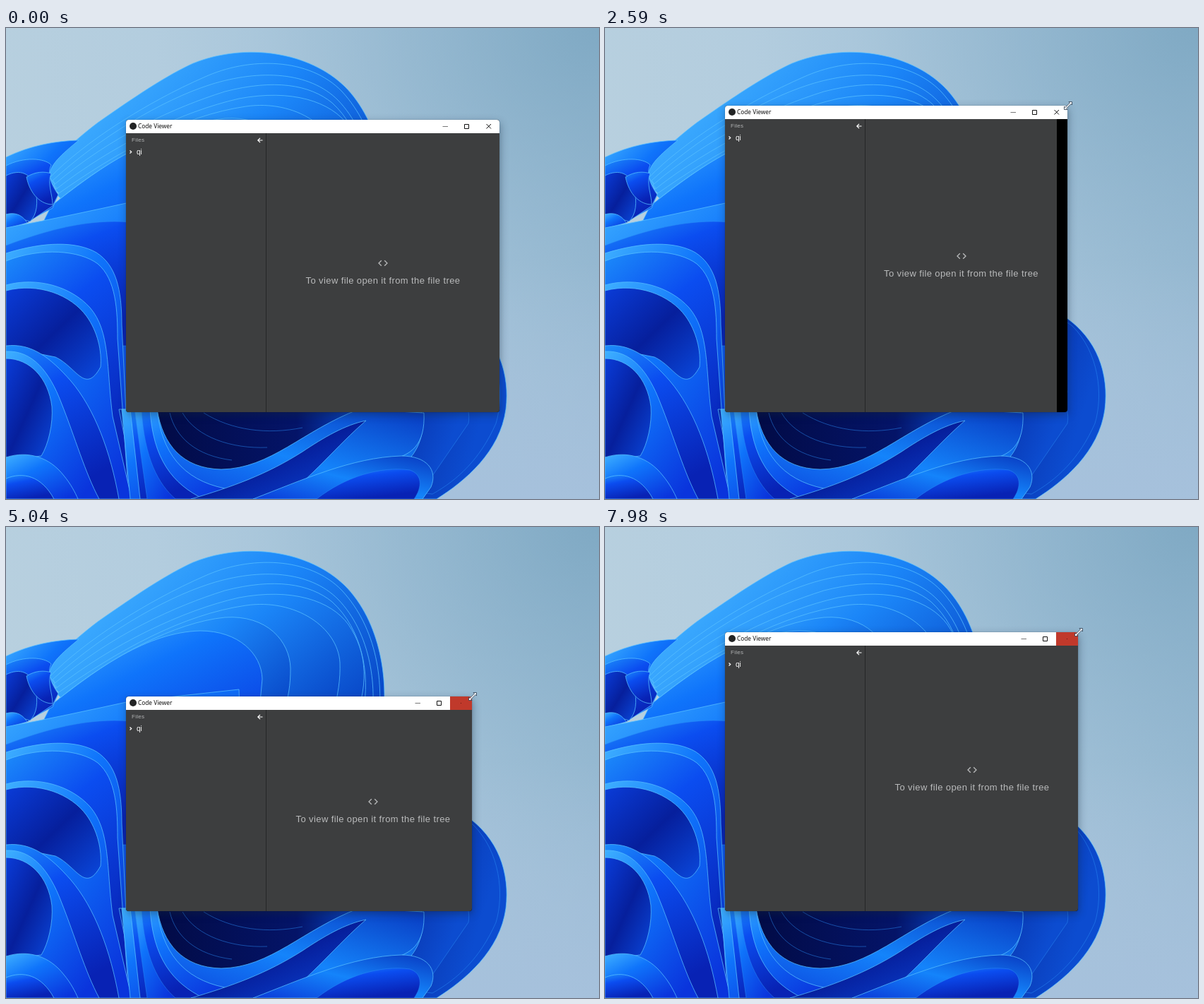
Animation of 840 by 667 pixels, one loop 8 s. Source, as an HTML page:

```html
<!DOCTYPE html>
<html lang="en">
<head>
<meta charset="utf-8">
<title>Code Viewer</title>
<style>
html, body { margin: 0; width: 100%; height: 100%; overflow: hidden; }
body { position: relative; background: #a9c6db; }
.wall { position: absolute; left: 0; top: 0; width: 840px; height: 667px; }
.fold path { stroke: #58c0ff; stroke-width: 1; stroke-opacity: .75; }
.fold .soft { stroke: #2b8cf5; stroke-opacity: .5; }
.win {
  position: absolute; left: 170px; width: 529px; height: 414px; top: 130px;
  border-radius: 4px; box-shadow: 1px 4px 12px rgba(20, 35, 60, .42), 0 0 1px rgba(0, 0, 0, .7);
}
.clip { position: absolute; inset: 0; overflow: hidden; border-radius: 4px; background: #000; }
.bar { position: absolute; left: 0; right: 0; top: 0; height: 19px; background: #fff; }
.dot { position: absolute; left: 5px; top: 4px; width: 10px; height: 10px; border-radius: 50%; background: #232425; }
.name { position: absolute; left: 17px; top: 3px; font: 8.3px/12px "Noto Sans", "Open Sans", sans-serif; color: #111; white-space: nowrap; }
.btns { position: absolute; right: 0; top: 0; width: 93px; height: 19px; }
.hot { position: absolute; right: 0; top: 0; width: 31px; height: 19px; background: #c0392b; visibility: hidden; }
.hot::after { content: ""; position: absolute; left: 15px; top: 9px; width: 1px; height: 1px; background: #621a14; }
.page { position: absolute; left: 0; top: 19px; background: #3d3e3f; font-family: "Liberation Sans", Arial, sans-serif; }
.side { position: absolute; left: 0; top: 0; bottom: 0; width: 198px; border-right: 1px solid #252627; }
.head { position: absolute; left: 8px; top: 4px; font-size: 8px; line-height: 11px; letter-spacing: .25px; color: #b2b3b4; }
.dir { position: absolute; left: 15px; top: 20px; font-size: 10px; line-height: 13px; color: #fff; }
.side svg { position: absolute; left: 0; top: 0; }
.view {
  position: absolute; left: 199px; right: 0; top: 0; bottom: 0; padding: 0 10px;
  display: flex; flex-direction: column; align-items: center; justify-content: center;
}
.view svg { flex: none; margin-bottom: 12px; }
.view p { margin: 0; font-size: 13px; line-height: 15px; letter-spacing: .385px; color: #b9babb; }
.cur { position: absolute; left: -8px; top: -8px; visibility: hidden; }
</style>
</head>
<body>
<svg class="wall" viewBox="0 0 840 667">
  <defs>
    <linearGradient id="sky" x1="0" y1=".5" x2="1" y2=".35">
      <stop offset="0" stop-color="#b8d0df"/><stop offset=".5" stop-color="#b0cbde"/><stop offset="1" stop-color="#98bad2"/>
    </linearGradient>
    <radialGradient id="dim" cx="1" cy="0" r=".75">
      <stop offset="0" stop-color="#78a4bf" stop-opacity=".75"/><stop offset="1" stop-color="#8fb5d0" stop-opacity="0"/>
    </radialGradient>
    <linearGradient id="low" x1="0" y1="0" x2="0" y2="1">
      <stop offset=".5" stop-color="#a6c1dc" stop-opacity="0"/><stop offset="1" stop-color="#a6c1dc"/>
    </linearGradient>
    <linearGradient id="top" x1=".2" y1="0" x2="1" y2=".6">
      <stop offset="0" stop-color="#43b2ff"/><stop offset=".45" stop-color="#1b86f8"/><stop offset="1" stop-color="#0743c4"/>
    </linearGradient>
    <linearGradient id="mid" x1="0" y1="0" x2=".8" y2="1">
      <stop offset="0" stop-color="#3fb0ff"/><stop offset=".4" stop-color="#0f74fb"/><stop offset="1" stop-color="#0a34dc"/>
    </linearGradient>
    <linearGradient id="cup" x1="0" y1="0" x2=".4" y2="1">
      <stop offset="0" stop-color="#1c8cfa"/><stop offset=".35" stop-color="#0b4df0"/><stop offset="1" stop-color="#0822b4"/>
    </linearGradient>
    <linearGradient id="deep" x1="0" y1="0" x2="1" y2="1">
      <stop offset="0" stop-color="#0a3cd8"/><stop offset=".5" stop-color="#061f9c"/><stop offset="1" stop-color="#0a48dc"/>
    </linearGradient>
    <linearGradient id="rim" x1="0" y1="0" x2="1" y2=".3">
      <stop offset="0" stop-color="#0b3fd2"/><stop offset=".5" stop-color="#072a9c"/><stop offset="1" stop-color="#0c4cd0"/>
    </linearGradient>
    <linearGradient id="wave" x1="0" y1="1" x2="1" y2="0">
      <stop offset="0" stop-color="#0a3ad8"/><stop offset=".5" stop-color="#1484fb"/><stop offset="1" stop-color="#0839c0"/>
    </linearGradient>
    <linearGradient id="pit" x1="0" y1="0" x2="1" y2="0">
      <stop offset="0" stop-color="#0a2ea8"/><stop offset=".15" stop-color="#020b46"/><stop offset=".7" stop-color="#041468"/><stop offset="1" stop-color="#0a50dc"/>
    </linearGradient>
  </defs>
  <rect width="840" height="667" fill="url(#sky)"/>
  <rect width="840" height="667" fill="url(#dim)"/>
  <rect width="840" height="667" fill="url(#low)"/>

  <g class="fold">
    <!-- upper petal -->
    <g fill="url(#top)">
      <path d="M60 212C58 196 88 166 130 134C190 92 230 66 265 50C340 20 430 34 480 83C530 133 545 220 531 290C521 340 502 362 486 385L200 420Z"/>
      <path d="M62 212C110 162 200 105 280 70C345 40 430 42 476 90C525 143 537 220 526 290L486 372L200 400Z"/>
      <path d="M66 216C130 157 220 102 290 80C360 58 430 62 470 102C517 150 528 230 515 290L484 350L200 390Z"/>
      <path d="M68 222C150 152 240 112 310 90C380 72 430 80 462 106C505 145 516 210 506 260L484 320L200 380Z"/>
      <path d="M70 229C150 166 250 118 330 100C405 86 460 104 485 138C512 178 516 225 488 290L200 370Z"/>
      <path d="M72 236C160 174 250 124 340 111C410 101 470 142 473 192C474 215 470 240 463 265L200 360Z"/>
      <path d="M75 243C150 182 240 135 310 128C370 124 402 162 403 200C403 225 400 240 394 260L200 350Z"/>
    </g>
    <path fill="url(#mid)" d="M64 252C130 200 200 149 275 147C330 147 362 180 363 215L358 270L200 350L40 300Z"/>
    <!-- left petals -->
    <path fill="url(#mid)" d="M0 183C35 166 70 160 103 159C80 178 58 196 62 214L74 236L66 255L0 290Z"/>
    <path fill="url(#cup)" d="M0 195C25 182 55 184 64 194C58 206 64 222 74 236L66 252L30 276L0 272Z"/>
    <path fill="url(#deep)" d="M0 209C20 199 36 206 41 226C46 248 44 264 34 274L0 264Z"/>
    <path fill="url(#cup)" d="M29 211C42 203 54 203 64 206C58 220 66 236 66 250C50 250 34 236 29 211Z"/>
    <path fill="url(#mid)" d="M0 264C14 260 24 266 30 276L0 284Z"/>
    <path fill="url(#mid)" d="M0 283C60 272 115 260 175 247L330 230L340 560L0 560Z"/>
    <path class="soft" fill="url(#cup)" d="M0 308C60 285 120 270 175 275L175 450L0 450Z"/>
    <path fill="url(#mid)" d="M0 319C55 302 100 302 128 318C156 336 164 370 164 420L176 667L0 667Z"/>
    <path fill="url(#cup)" d="M0 330C50 310 105 315 130 334C156 356 158 400 158 440L174 667L0 667Z"/>
    <path fill="url(#mid)" d="M0 364C44 352 92 366 119 396C148 430 142 480 151 550L178 667L0 667Z"/>
    <path fill="url(#deep)" d="M0 372C46 360 92 378 114 408C130 430 136 458 134 480C112 520 100 480 70 466L0 452Z"/>
    <path fill="url(#cup)" d="M0 450C36 446 62 466 92 500C126 540 148 600 160 667L0 667Z"/>
    <path fill="url(#mid)" d="M0 458C38 456 62 488 78 530C98 580 112 630 132 667L0 667Z"/>
    <path fill="url(#deep)" d="M0 468C34 468 60 496 65 536C67 560 60 590 50 606L0 612Z"/>
    <path fill="url(#mid)" d="M0 608C32 598 62 608 82 634C92 646 98 658 102 667L0 667Z"/>
    <path fill="url(#cup)" d="M0 638C24 628 50 634 68 667L0 667Z"/>
    <!-- lower right petal -->
    <path fill="url(#rim)" d="M440 410C500 368 590 360 650 408C698 440 714 490 708 540C700 600 650 642 610 667L400 667Z"/>
    <path class="soft" fill="url(#rim)" d="M450 450C510 392 610 382 662 422C700 460 706 520 694 560C672 610 640 640 604 660L420 640Z"/>
    <path class="soft" fill="url(#wave)" d="M440 490C490 424 540 404 582 420C620 436 648 470 655 515C640 590 610 620 590 640L420 640Z"/>
    <path class="soft" fill="url(#rim)" d="M440 530C500 476 560 460 610 486C640 502 660 535 655 560L600 640L420 640Z"/>
    <path fill="url(#wave)" d="M430 560C490 488 556 470 584 530C596 560 590 590 570 612L400 667Z"/>
    <!-- lower centre -->
    <path fill="url(#pit)" stroke="none" d="M160 540H520C460 570 410 640 310 628L180 640Z"/>
    <path class="soft" fill="none" d="M232 545C240 580 270 606 320 612M250 545C270 580 320 596 370 594M280 545C320 570 370 576 420 566"/>
    <path fill="url(#wave)" d="M214 540C222 590 250 624 305 625C375 624 420 570 500 540L592 545C594 590 575 606 540 612L420 667L180 667Z"/>
    <path fill="url(#mid)" d="M164 540L214 540C220 600 250 640 310 652L330 667H176Z"/>
    <path fill="url(#cup)" d="M176 540L204 540C208 610 236 646 280 667H190Z"/>
    <path class="soft" fill="url(#mid)" d="M182 540L192 540C196 610 216 646 240 667H200Z"/>
    <path fill="url(#deep)" d="M262 667C320 650 370 632 420 600C450 580 480 562 510 556C470 590 430 640 390 667Z"/>
    <path fill="url(#wave)" d="M350 667C420 640 490 608 560 606C596 606 612 626 602 650L590 667Z"/>
    <path class="soft" fill="url(#cup)" d="M440 667C480 636 530 620 572 626C590 632 590 650 578 667Z"/>
  </g>
</svg>

<div class="win" id="win">
  <div class="clip">
    <div class="page" id="page">
      <div class="side">
        <div class="head">Files</div>
        <div class="dir">qi</div>
        <svg width="198" height="34" fill="none" stroke="#fff" stroke-width="1.2">
          <path d="M187 10H193.500M190 6.800L186.800 10L190 13.200M5.500 24.500L7.700 26.500L5.500 28.500"/>
        </svg>
      </div>
      <div class="view">
        <svg width="14" height="10" viewBox="0 0 14 10" fill="none" stroke="#b9babb" stroke-width="1.3">
          <path d="M4.800 1.200L1 5L4.800 8.800M9.200 1.200L13 5L9.200 8.800"/>
        </svg>
        <p>To view file open it from the file tree</p>
      </div>
    </div>
    <div class="bar">
      <div class="dot"></div>
      <div class="name">Code Viewer</div>
      <svg class="btns" viewBox="0 0 93 19" fill="none" stroke="#111">
        <path stroke="#777" d="M12.500 9.500H20"/>
        <path d="M43.500 6.500H49.500V12.500H43.500Z"/>
        <path d="M74.500 6L81 12.500M81 6L74.500 12.500"/>
      </svg>
      <div class="hot" id="hot"></div>
    </div>
  </div>
</div>
<svg class="cur" id="cur" width="16" height="16" viewBox="-8 -8 16 16">
  <path d="M-5.500 5.500V1L-4 2.500L2.500 -4L1 -5.500H5.500V-1L4 -2.500L-2.500 4L-1 5.500Z" fill="#fff" stroke="#27384c" stroke-width=".8"/>
</svg>

<script>
const LOOP = 8000, STEP = 70, LEFT = 170, BOTTOM = 544, BAR = 19;
// time, right edge, top edge
const drag = [
  [0, 699, 130], [350, 699, 130], [420, 699, 130], [700, 770, 96], [910, 811, 79],
  [1190, 745, 150], [1500, 640, 235], [1820, 487, 204], [1890, 486, 199],
  [2170, 530, 140], [2520, 640, 110], [2870, 695, 130], [3220, 730, 214], [3290, 733, 238],
  [3500, 715, 290], [3780, 690, 270], [4060, 625, 190], [4340, 661, 152], [4410, 665, 157],
  [4700, 697, 200], [5040, 660, 240], [5320, 605, 180], [5600, 655, 122], [5670, 659, 125],
  [5950, 689, 165], [6230, 640, 140], [6440, 652, 150], [6650, 631, 182], [6720, 615, 187],
  [7000, 560, 170], [7300, 590, 115], [7650, 685, 105], [7910, 671, 146], [7980, 670, 149]
];
const $ = id => document.getElementById(id);
const win = $("win"), page = $("page"), hot = $("hot"), cur = $("cur");

function slope(i, k) {
  const a = drag[Math.max(i - 1, 0)], b = drag[Math.min(i + 1, drag.length - 1)];
  return (b[k] - a[k]) / (b[0] - a[0]);
}

function corner(t) {
  let i = 0;
  while (i < drag.length - 2 && t >= drag[i + 1][0]) i++;
  const a = drag[i], b = drag[i + 1], d = b[0] - a[0];
  const u = Math.min(1, Math.max(0, (t - a[0]) / d)), v = 1 - u;
  return [1, 2].map(k => Math.round(
    v * v * (1 + 2 * u) * a[k] + u * u * (3 - 2 * u) * b[k] +
    d * u * v * (v * slope(i, k) - u * slope(i + 1, k))));
}

function draw(now) {
  const t = Math.floor((now % LOOP) / STEP) * STEP;
  const [right, top] = corner(t), [oldRight, oldTop] = corner(t - STEP);
  win.style.top = top + "px";
  win.style.width = right - LEFT + "px";
  win.style.height = BOTTOM - top + "px";
  // the page repaints one step behind the frame
  page.style.width = oldRight - LEFT + "px";
  page.style.height = BOTTOM - BAR - Math.min(oldTop, top + 10) + "px";
  hot.style.visibility = oldRight > right ? "visible" : "hidden";
  cur.style.visibility = t >= 210 ? "visible" : "hidden";
  cur.style.transform = `translate(${right + 1}px, ${top}px)`;
}

function tick(now) {
  draw(now);
  requestAnimationFrame(tick);
}
draw(0);
requestAnimationFrame(tick);
</script>
</body>
</html>
```
